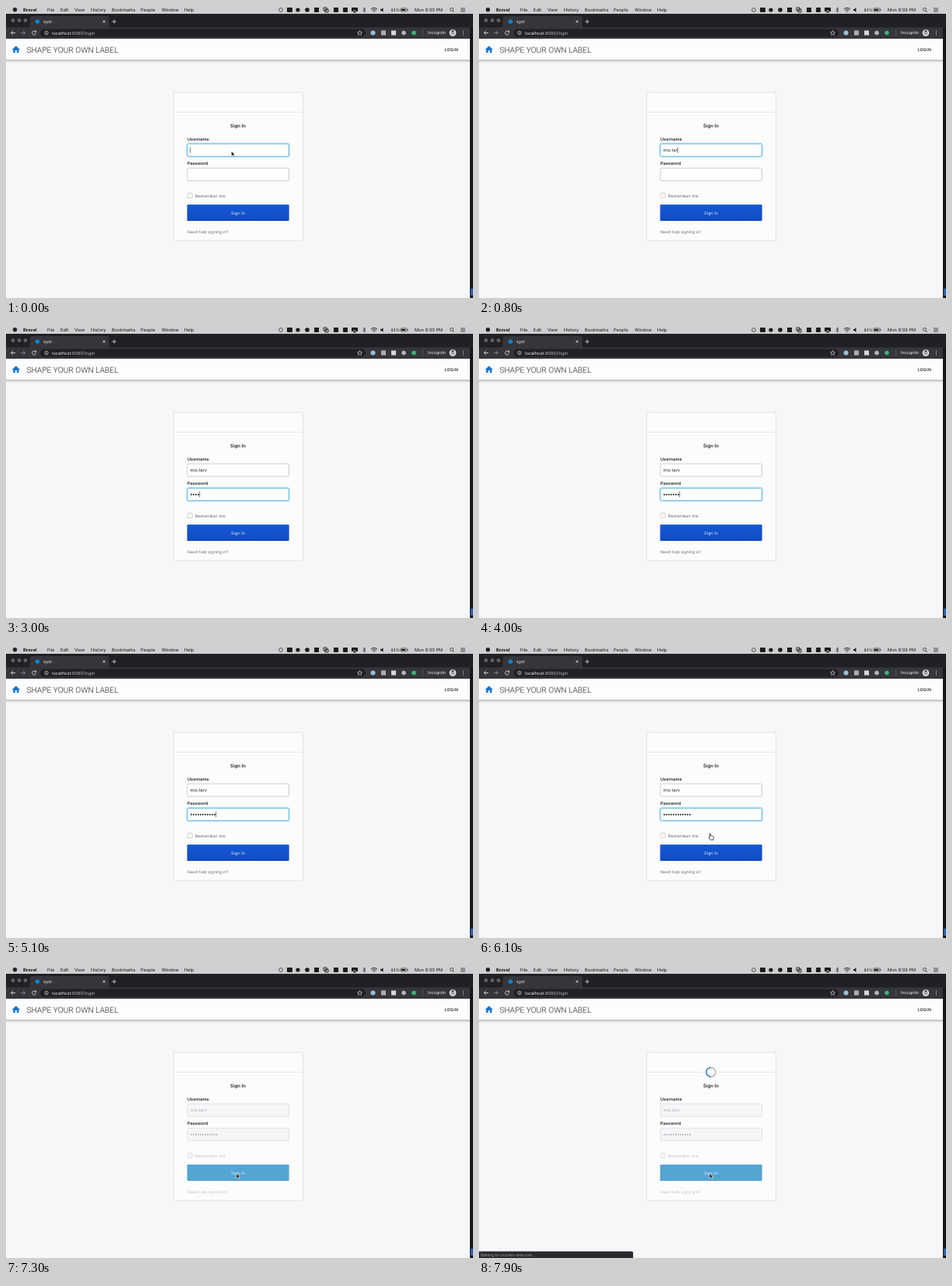
Recreate the animation shown at these times as an HTML page. Size 600 by 375 pixels, loop 8 s.

```html
<!DOCTYPE html>
<html lang="en">
<head>
<meta charset="utf-8">
<title>Sign in</title>
<style>
  html, body { margin: 0; width: 600px; height: 375px; overflow: hidden; background: #f8f6f9; }
  svg { display: block; font: 5.6px Inter, sans-serif; text-rendering: geometricPrecision; }
  .bold { font-weight: 600; }
  .mid { text-anchor: middle; }
  .line { fill: none; stroke: #d4d5d8; stroke-width: .9; }
  .field { fill: #fff; stroke: #bfbec3; stroke-width: .8; }
  .focus { stroke: #45addd; stroke-width: .9; filter: drop-shadow(0 0 1.3px #5cc6f0b0); }
  .soft { fill: #6e6e78; }
  #button { fill: url(#blue); }
  #button.hover { fill: #1359de; }
  .busy .field { fill: #f6f5f7; stroke: #dcdbdf; }
  .busy .value { fill: #b4b3b8; }
  .busy .soft { fill: #c3c2c7; }
  .busy #button { fill: #54a5d3; }
</style>
</head>
<body>
<svg width="600" height="375" viewBox="0 0 600 375">
  <defs>
    <linearGradient id="blue" x2="0" y2="1">
      <stop stop-color="#1558d5"/><stop offset="1" stop-color="#114bc4"/>
    </linearGradient>
    <linearGradient id="shade" x2="0" y2="1">
      <stop stop-color="#8c8b8e"/><stop offset=".35" stop-color="#d4d3d6"/><stop offset="1" stop-color="#f8f6f9"/>
    </linearGradient>
  </defs>

  <!-- page -->
  <rect width="600" height="375" fill="#f8f6f9"/>
  <rect y="69" width="596" height="4" fill="url(#shade)"/>
  <rect y="42" width="596" height="27.2" fill="#fefdfe"/>
  <path transform="translate(6.6 49.7) scale(.52)" d="M10 20v-6h4v6h5v-8h3L12 3 2 12h3v8z" fill="#1774d0"/>
  <g fill="#222" font-family="Roboto, sans-serif">
    <text x="26.5" y="59.7" font-size="10.2" font-weight="300">SHAPE YOUR OWN LABEL</text>
    <text x="563.5" y="57.9" font-size="5.4" font-weight="500" letter-spacing=".45">LOGIN</text>
  </g>

  <!-- menu bar -->
  <rect width="600" height="10" fill="#d0ced0"/>
  <circle cx="11.5" cy="4.7" r="2.7" fill="#222"/>
  <g id="menu" fill="#141414"></g>
  <g fill="#1c1c1c">
    <circle cx="353" cy="5" r="2.4" fill="none" stroke="#555"/>
    <rect x="361" y="2" width="7" height="6" rx="1"/>
    <circle cx="375" cy="5" r="2.6"/>
    <circle cx="387" cy="5" r="2.8"/>
    <rect x="396" y="2" width="6" height="6"/>
    <path d="M408 2h4v4h-4zM410 4h4v4h-4z" fill="none" stroke="#2a2a2a"/>
    <rect x="421" y="2" width="6" height="6"/>
    <rect x="433" y="2" width="6" height="6" rx="1"/>
    <path d="M444 2h8v5h-2l-2-2-2 2h-2zM448 6l2.4 2.5h-4.8z"/>
    <path d="M458.5 3.3l3.5 3-1.7 1.7V2L462 3.6l-3.5 3" fill="none" stroke="#333" stroke-width=".7"/>
    <path d="M469 4a6 6 0 0 1 8 0M470.4 5.6a4 4 0 0 1 5.2 0M472 7h2" fill="none" stroke="#2a2a2a"/>
    <path d="M481 4h1.5l2-2v6l-2-2H481z"/>
    <rect x="507" y="3" width="8" height="4" rx=".6" fill="none" stroke="#333" stroke-width=".7"/>
    <path d="M508 4h5v2h-5zM515.6 4h.8v2h-.8z"/>
    <circle cx="572.5" cy="4.4" r="2" fill="none" stroke="#333" stroke-width=".8"/>
    <path d="M574 6l2 2M584 3h6M584 5h6M584 7h6" stroke="#333" stroke-width=".8"/>
  </g>

  <!-- browser frame -->
  <rect y="10" width="600" height="18" fill="#202124"/>
  <path d="M28 28q2.5 0 2.5-3V16q0-3 3-3h96q3 0 3 3v9q0 3 2.5 3zM0 27.5h596V42H0z" fill="#35363a"/>
  <g fill="#606266">
    <circle cx="9" cy="18.5" r="2.4"/><circle cx="17" cy="18.5" r="2.4"/><circle cx="25" cy="18.5" r="2.4"/>
  </g>
  <circle cx="40.5" cy="20" r="2.8" fill="#1580c8"/>
  <rect x="44" y="29.5" width="418" height="10" rx="5" fill="#202124"/>
  <g class="line">
    <path d="M124.5 18.5l3 3m0-3l-3 3M139 17.5v5m-2.5-2.5h5"/>
    <path d="M12 34.5H6.5m2.5-2.5l-2.5 2.5L9 37"/>
    <path d="M19 34.5h5.5M22 32l2.5 2.5L22 37" stroke="#85868a"/>
    <path d="M38.3 33.3a2.5 2.5 0 1 0 .2 2M38.7 31.5v2h-2"/>
    <circle cx="52" cy="34.5" r="2.2" stroke-width=".7"/><path d="M52 34v1.8m0-2.9v.6" stroke-width=".7"/>
    <path d="M454.5 31.5l.9 2 2.2.2-1.7 1.5.5 2.2-1.9-1.2-1.9 1.2.5-2.2-1.7-1.5 2.2-.2z" stroke-width=".7"/>
    <path d="M535.5 30v9" stroke="#54555a"/>
  </g>
  <circle cx="471.5" cy="34.5" r="3" fill="#9dbfd8"/>
  <rect x="482" y="31.5" width="6" height="6" fill="#aeb0b3"/>
  <rect x="495" y="31.5" width="6" height="6" fill="#d8d9da"/>
  <circle cx="511" cy="34.5" r="2.8" fill="#b5b7ba"/>
  <circle cx="524" cy="34.5" r="2.8" fill="#3fb27f"/>
  <circle cx="574" cy="34.5" r="4.3" fill="#f1f1f2"/>
  <path d="M570.8 34h6.4M572.5 33l.4-1.5h2.2l.4 1.5z" fill="#444" stroke="#444" stroke-width=".6"/>
  <g fill="none" stroke="#444" stroke-width=".6"><circle cx="572.7" cy="35.8" r=".9"/><circle cx="575.3" cy="35.8" r=".9"/></g>
  <path d="M587.5 32v.1m0 2.4v.1m0 2.4v.1" stroke="#ddd" stroke-width="1.2" stroke-linecap="round"/>
  <g fill="#f0f0f2">
    <text x="48" y="22">syol</text>
    <text x="59" y="36.5" font-size="5.7">localhost<tspan fill="#b8babd">:8080/login</tspan></text>
    <text x="542" y="36.4" font-size="5.3">Incognito</text>
  </g>
  <rect x="596" y="28" width="4" height="347" fill="#17171a"/>
  <rect x="597" y="363" width="3" height="9" fill="#2863b4"/>

  <!-- sign-in card -->
  <g id="form" fill="#25252b">
    <rect x="215.5" y="111" width="166" height="190.2" rx="1" fill="#fdfcfd" stroke="#dfdee1" stroke-width=".9"/>
    <path d="M216 136.3h165" stroke="#e2e1e4" stroke-width=".9"/>
    <g id="spinner" fill="none">
      <circle cx="298" cy="136.3" r="11" fill="#fdfcfd"/>
      <circle cx="298" cy="136.3" r="6" stroke="#aaa9ad" stroke-width="1.2"/>
      <path id="arc" d="M298 130.3a6 6 0 0 0 0 12" stroke="#2380bd" stroke-width="1.3"/>
    </g>
    <text class="bold mid" x="298" y="155.8" font-size="6.1">Sign In</text>
    <text class="bold" x="233" y="172.5">Username</text>
    <rect id="user" class="field" x="233" y="177" width="130.5" height="16.2" rx="1.3"/>
    <text id="name" class="value" x="236.5" y="187"></text>
    <text class="bold" x="233" y="203.7">Password</text>
    <rect id="pass" class="field" x="233" y="208.2" width="130.5" height="16.2" rx="1.3"/>
    <g id="dots" class="value"></g>
    <rect id="caret" y="181.3" width=".7" height="7.5" fill="#333"/>
    <rect class="field" x="233.3" y="240.3" width="6" height="6" rx=".8"/>
    <text class="soft" x="242.7" y="245.6" font-size="5.7">Remember me</text>
    <rect id="button" x="232.7" y="255" width="131" height="21" rx="1.2"/>
    <text class="mid" x="298" y="267.6" fill="#d5e2f7">Sign In</text>
    <text class="soft" x="233" y="291.7" font-size="5.2">Need help signing in?</text>
  </g>

  <g id="status">
    <path d="M0 366.5h196.5q1.5 0 1.5 1.5v7H0z" fill="#292a2d"/>
    <text x="2" y="372.7" font-size="4.9" fill="#a2a3a6">Waiting for miotarv.okta.com...</text>
  </g>
  <g stroke="#fff" stroke-width=".6">
    <path id="arrow" d="M0 0v6.2l1.5-1.3 1.2 2.5 1.2-.6-1.2-2.3h2z" fill="#111"/>
    <path id="hand" d="M1.3 4V.7q.7-1 1.4 0v2.5l2.8.6q1 .3.9 1.3L6 8.500H2.4L.2 5.500q0-1 1.1-.3z" fill="#fff" stroke="#222" stroke-width=".8"/>
  </g>
</svg>
<script>
const LOOP = 8000, STEP = 100;
const BLUR = 1400, HOVER = 6400, BUSY = 7300, LOADING = 7500;
const LOGIN = 'mio.tarv';
const nameKeys = [...LOGIN].map((_, i) => 200 + i * 100);
const dotKeys = [2100, 2400, 2700, 2900, 3400, 3800, 4000, 4200, 4500, 4600, 4800, 5200];
const path = [[5700, 290, 190], [5900, 293, 216], [6100, 295, 240.5], [6500, 295, 264], [7000, 294, 265.5], [7300, 296, 266.5]];

const $ = id => document.getElementById(id);
const show = (id, on) => $(id).style.display = on ? '' : 'none';
const svg = (tag, attrs, parent, text = '') => {
  const el = document.createElementNS('http://www.w3.org/2000/svg', tag);
  for (const key in attrs) el.setAttribute(key, attrs[key]);
  el.textContent = text;
  return parent.appendChild(el);
};

[[22, 'Brovel'], [53, 'File'], [70, 'Edit'], [88, 'View'], [109, 'History'], [136, 'Bookmarks'], [173, 'People'],
 [200, 'Window'], [229, 'Help'], [494.5, '83%'], [525, 'Mon 9:00 PM']].forEach(([x, label], i) =>
  svg('text', { x, y: 6.8, 'font-weight': i ? 400 : 700, 'font-size': label === '83%' ? 5 : 5.7 }, $('menu'), label));
const dots = dotKeys.map((_, i) => svg('circle', { cx: 238 + i * 3, cy: 216.5, r: 1.05 }, $('dots')));

function pointer(t) {
  if (t < 100) return [289.5, 186.5];
  if (t < path[0][0]) return null;
  const next = path.findIndex(p => p[0] > t);
  if (next < 0) return path.at(-1).slice(1);
  const [a, b] = [path[next - 1], path[next]];
  const k = (t - a[0]) / (b[0] - a[0]);
  return [1, 2].map(i => a[i] + (b[i] - a[i]) * k);
}

function draw(t) {
  const typed = keys => keys.filter(k => k <= t);
  const letters = typed(nameKeys), bullets = typed(dotKeys);
  const inPassword = t >= BLUR, busy = t >= BUSY;

  $('name').textContent = LOGIN.slice(0, letters.length);
  dots.forEach((dot, i) => dot.style.display = i < bullets.length ? '' : 'none');
  $('form').classList.toggle('busy', busy);
  $('user').classList.toggle('focus', !inPassword);
  $('pass').classList.toggle('focus', inPassword && !busy);
  $('button').classList.toggle('hover', t >= HOVER);

  // the caret blinks every half second after the last key
  const lastKey = inPassword ? bullets.at(-1) ?? BLUR : letters.at(-1) ?? 0;
  show('caret', !busy && (t - lastKey) % 1000 < 500);
  const nameWidth = letters.length ? $('name').getComputedTextLength() : 0;
  $('caret').setAttribute('x', 236.5 + (inPassword ? bullets.length * 3 : nameWidth));
  $('caret').setAttribute('y', inPassword ? 212.5 : 181.3);

  const at = pointer(t), isHand = t >= 5900 && !busy;
  show('arrow', at && !isHand);
  show('hand', at && isHand);
  if (at) $(isHand ? 'hand' : 'arrow').setAttribute('transform', `translate(${at})`);

  show('status', t >= LOADING);
  show('spinner', t >= LOADING);
  $('arc').setAttribute('transform', `rotate(${(t - 7900) * .36} 298 136.3)`);
}

function frame() {
  draw(Math.floor(performance.now() % LOOP / STEP) * STEP);
  requestAnimationFrame(frame);
}
frame();
</script>
</body>
</html>
```
